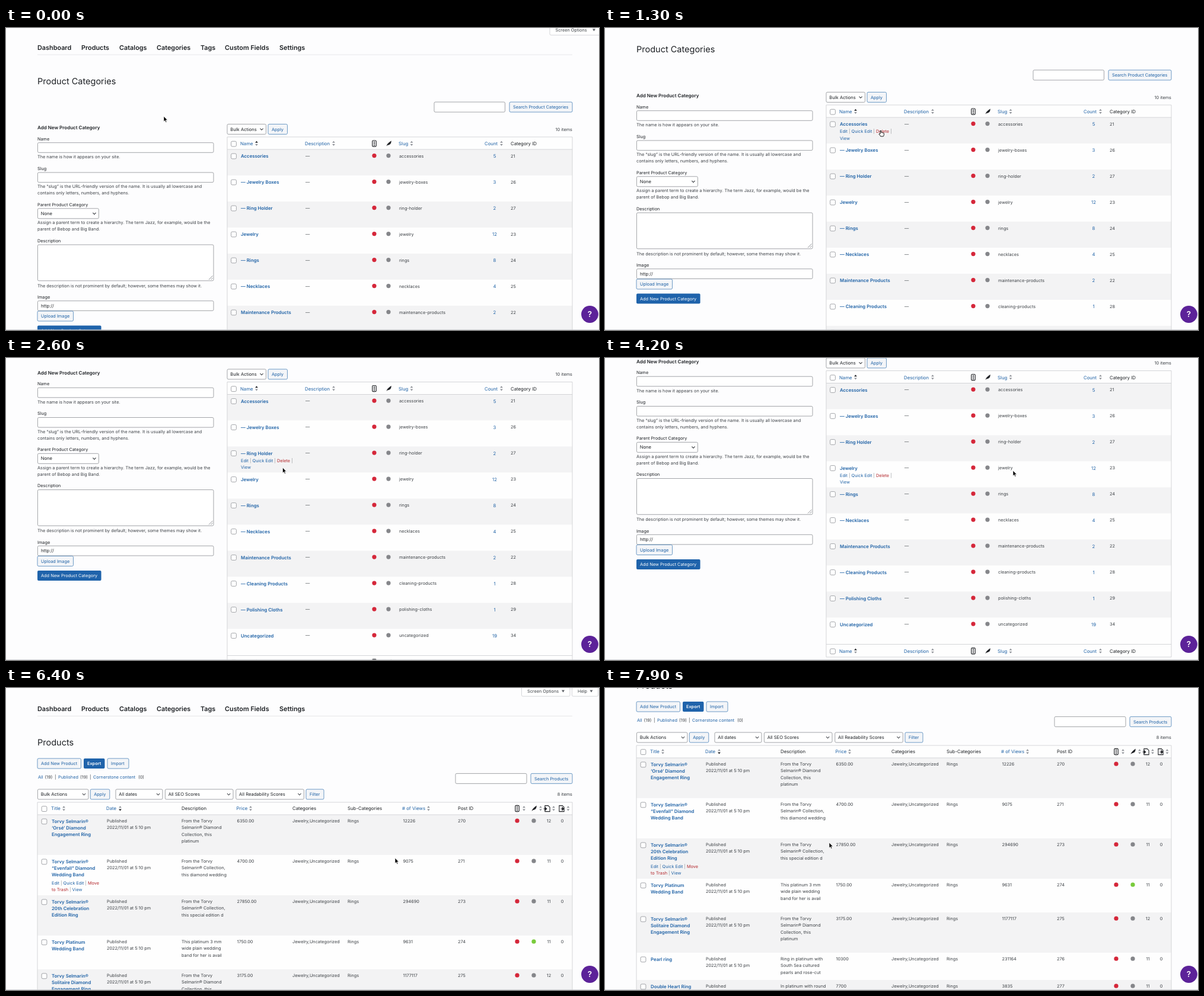
An HTML page for the animation above (8 s loop, 1000 px wide and 510 px high).

```html
<!DOCTYPE html>
<html lang="en">
<head>
<meta charset="utf-8">
<title>Shop admin</title>
<style>
  html, body { margin: 0; width: 100%; height: 100%; overflow: hidden; background: #fdfdfe; }
  svg { display: block; width: 1000px; height: 510px; }
  text {
    font: 7.3px Inter, "Open Sans", sans-serif;
    fill: #3c4045;
    dominant-baseline: central;
    text-rendering: geometricPrecision;
    white-space: pre;
  }
  .link { fill: #1f62a6; }
  .dark { fill: #1d2024; }
  .white { fill: #fff; }
  .del { fill: #b3262b; }
  .bar { fill: #8e9094; }
  .box { fill: #fff; stroke: #8c8f94; stroke-width: .8; }
  .btn { fill: #f3f5f8; stroke: #4a82b8; stroke-width: .8; }
  .primary { fill: #1f63ab; }
  .rule { stroke: #cbccd0; stroke-width: .8; fill: none; }
  .hide { display: none; }
</style>
</head>
<body>
<svg id="stage" viewBox="0 0 1000 510" xmlns="http://www.w3.org/2000/svg"></svg>
<script>
const LOOP = 8000, STEP = 100, SWITCH = 5700;
const RED = '#d5273a', GREY = '#85868a', GREEN = '#79cb3c', INK = '#202226';
const stage = document.getElementById('stage');

function el(parent, tag, attrs, content) {
  const node = document.createElementNS('http://www.w3.org/2000/svg', tag);
  for (const key in attrs) node.setAttribute(key, attrs[key]);
  if (content !== undefined) node.textContent = content;
  return parent.appendChild(node);
}

function text(g, x, y, str, cls = '', size = 7.3, weight = 400, anchor = 'start') {
  return el(g, 'text', {
    x, y, class: cls, 'text-anchor': anchor,
    style: `font-size:${size}px;font-weight:${weight}`
  }, str);
}

const lines = (g, x, y, list, ...rest) =>
  list.forEach((str, i) => text(g, x, y + i * 11.25, str, ...rest));

const rect = (g, x, y, width, height, cls, rx = 2) =>
  el(g, 'rect', { x, y, width, height, rx, class: cls });

const path = (g, d, attrs) => el(g, 'path', { d, fill: 'none', ...attrs });

const dot = (g, cx, cy, fill) => el(g, 'circle', { cx, cy, r: 3.6, fill });

const checkbox = (g, x, y) => rect(g, x - 4.4, y - 4.2, 8.8, 8.8, 'box', 2);

function button(g, x, y, w, label, primary, weight) {
  rect(g, x, y, w, 17, primary ? 'primary' : 'btn');
  text(g, x + 6, y + 8.6, label, primary ? 'white' : 'link', 7.35, weight);
}

function select(g, x, y, w, label) {
  rect(g, x, y, w, 17, 'box');
  text(g, x + 5.3, y + 8.6, label, 'dark', 7.6);
  path(g, `M${x + w - 10} ${y + 7.2}l2.6 2.6l2.6 -2.6`, { stroke: '#45484d', 'stroke-width': 1.1 });
}

// active: -1 sorted upwards, 1 sorted downwards
function sorter(g, x, y, active = 0) {
  const tone = side => active === side ? INK : '#8f9298';
  path(g, `M${x - 2.4} ${y - 1.2}h4.8l-2.4 -3z`, { fill: tone(-1) });
  path(g, `M${x - 2.4} ${y + 1}h4.8l-2.4 3z`, { fill: tone(1) });
}

function trafficIcon(g, x, y) {
  el(g, 'rect', { x: x - 3.2, y: y - 5, width: 6.4, height: 10.2, rx: 1.4, fill: '#fff', stroke: INK, 'stroke-width': 1.2 });
  for (const dy of [-2.6, .1, 2.8]) el(g, 'circle', { cx: x, cy: y + dy, r: 1, fill: INK });
}

function featherIcon(g, x, y) {
  path(g, `M${x - 4} ${y + 4.6}c1-3 2-4 3-5c2-2.4 4-3 5.2-4.4c.2 3-.6 5-2.2 6.2c-1.4 1-2.8 1.2-4 1.4z`, { fill: INK });
}

function pageIcon(g, x, y, arrowX) {
  path(g, `M${x - 3.6} ${y - 4.8}h5.4l2.8 2.8v7.2h-8.2z`, { stroke: INK, 'stroke-width': 1.1 });
  path(g, `M${arrowX} ${y + .6}h4m-1.4 -2.4l2.6 2.4l-2.6 2.4z`, { stroke: INK, 'stroke-width': 1.2, fill: INK });
}

function tab(g, x, w, bottom, label) {
  path(g, `M${x} -20V${bottom - 2}q0 2 2 2h${w - 4}q2 0 2 -2V-20`, { class: 'rule', style: 'fill:#fff' });
  text(g, x + 9.5, bottom - 8.6, label);
  path(g, `M${x + w - 14} ${bottom - 10.5}h5l-2.5 4z`, { fill: '#5c6066' });
}

function navBar(g, y) {
  const items = { Dashboard: 53, Products: 127, Catalogs: 191, Categories: 254, Tags: 328, 'Custom Fields': 369, Settings: 461 };
  for (const name in items) text(g, items[name], y, name, 'dark', 10.85, 600);
  path(g, `M53 ${y + 12.6}H955`, { stroke: '#e2e3e5', 'stroke-width': .8 });
}

// one line of row actions, split by thin bars
function actionLine(g, x, y, parts) {
  const line = text(g, x, y, '');
  parts.forEach(([label, cls]) => el(line, 'tspan', { class: cls }, label));
}
const BAR = [' | ', 'bar'];

function stripe(g, x, y, h, odd) {
  el(g, 'rect', { x, y, width: 955 - x, height: h, fill: odd ? '#fefefe' : '#f3f3f4' });
}

/* Category list */
const catRows = [
  ['Accessories', 5, 21], ['— Jewelry Boxes', 3, 26], ['— Ring Holder', 2, 27],
  ['Jewelry', 12, 23], ['— Rings', 8, 24], ['— Necklaces', 4, 25],
  ['Maintenance Products', 2, 22], ['— Cleaning Products', 1, 28],
  ['— Polishing Cloths', 1, 29], ['Uncategorized', 19, 34]
];

function catHeader(g, y) {
  checkbox(g, 384, y + .5);
  text(g, 395, y, 'Name', 'link', 7.8);
  sorter(g, 422.5, y, -1);
  text(g, 504, y, 'Description', 'link', 7.8);
  sorter(g, 552.5, y);
  trafficIcon(g, 621, y);
  featherIcon(g, 645.5, y);
  text(g, 662, y, 'Slug', 'link', 7.8);
  sorter(g, 684, y);
  text(g, 807, y, 'Count', 'link', 7.8);
  sorter(g, 835.5, y);
  text(g, 851, y, 'Category ID', 'dark', 7.8);
}

function buildCategories(g) {
  tab(g, 917, 86, 12, 'Screen Options');
  navBar(g, 32.5);
  text(g, 53, 90, 'Product Categories', 'dark', 14.5);
  rect(g, 722, 125, 119.5, 17, 'box');
  button(g, 849, 125, 106, 'Search Product Categories');

  text(g, 53, 168, 'Add New Product Category', 'dark', 8, 600);
  const labels = { Name: 187, Slug: 237.3, 'Parent Product Category': 298.3, Description: 359.3, Image: 454.5 };
  for (const name in labels) text(g, 53, labels[name], name, 'dark');
  for (const y of [193.7, 244, 460.8]) rect(g, 53.4, y, 296.6, 16.6, 'box');
  lines(g, 53, 217.6, ['The name is how it appears on your site.']);
  lines(g, 53, 267.6, ['The “slug” is the URL-friendly version of the name. It is usually all lowercase and',
    'contains only letters, numbers, and hyphens.']);
  select(g, 53.4, 304.8, 103, 'None');
  lines(g, 53, 328.7, ['Assign a parent term to create a hierarchy. The term Jazz, for example, would be the',
    'parent of Bebop and Big Band.']);
  rect(g, 53.4, 366, 296.6, 60.8, 'box');
  path(g, 'M342 425l6.5 -6.5M345.5 425l3 -3', { stroke: '#777a80', 'stroke-width': .8 });
  lines(g, 53, 435, ['The description is not prominent by default; however, some themes may show it.']);
  text(g, 59, 469.2, 'http://', 'dark', 7.6);
  button(g, 53, 478, 60.5, 'Upload Image');
  button(g, 53, 502.6, 107.6, 'Add New Product Category', true);

  select(g, 373, 162.4, 65.5, 'Bulk Actions');
  button(g, 442, 162.4, 32.5, 'Apply');
  text(g, 955, 171, '10 items', '', 7.35, 400, 'end');

  el(g, 'rect', { x: 373, y: 184, width: 582, height: 483.5, fill: '#fefefe' });
  catHeader(g, 195);
  catRows.forEach(([name, count, id], i) => {
    const top = 205 + i * 44, y = top + 11;
    stripe(g, 373, top, 44, i % 2);
    checkbox(g, 384, y + .3);
    text(g, 396, y, name, 'link', 7.8, 600);
    text(g, 505, y, '—');
    dot(g, 621, y - .4, RED);
    dot(g, 645, y - .4, GREY);
    text(g, 663, y, name.replace('— ', '').toLowerCase().replace(' ', '-'));
    text(g, 824, y, count, 'link', 7.8, 400, 'middle');
    text(g, 851, y, id);
  });
  catHeader(g, 657.2);
  path(g, 'M373 184H955V667.5H373ZM373 205H955M373 646H955', { class: 'rule' });

  const actions = el(g, 'g', { class: 'hide' });
  actionLine(actions, 396, 23.3, [['Edit', 'link'], BAR, ['Quick Edit', 'link'], BAR, ['Delete', 'del'], BAR]);
  actionLine(actions, 396, 34.6, [['View', 'link']]);
  return actions;
}

/* Product list */
const maker = 'Torvy', series = 'Selmarin®', brand = `${maker} ${series}`;
const from = `From the ${maker}`;
// top, title, description, price, views, links, readability
const products = [
  [214, [brand, '‘Orsé’ Diamond', 'Engagement Ring'], [from, `${series} Diamond`, 'Collection, this', 'platinum'], '6350.00', 12226, 12],
  [282, [brand, '“Evenfall” Diamond', 'Wedding Band'], [from, `${series} Collection,`, 'this diamond wedding'], '4700.00', 9075, 11],
  [350, [brand, '20th Celebration', 'Edition Ring'], [from, `${series} Collection,`, 'this special edition d'], '27850.00', 294690, 11],
  [418, [`${maker} Platinum`, 'Wedding Band'], ['This platinum 3 mm', 'wide plain wedding', 'band for her is avail'], '1750.00', 9631, 11, GREEN],
  [475, [brand, 'Solitaire Diamond', 'Engagement Ring'], [from, `${series} Diamond`, 'Collection, this', 'platinum'], '3175.00', 1177117, 12],
  [543, ['Pearl ring'], ['Ring in platinum with', 'South Sea cultured', 'pearls and rose-cut'], '10300', 231164, 11],
  [589, ['Double Heart Ring'], ['In platinum with round'], '7700', 3835, 11]
];
const productEnd = 646;

function buildProducts(g) {
  tab(g, 869.5, 81.5, 14, 'Screen Options');
  tab(g, 954.5, 44, 14, 'Help');
  navBar(g, 34.8);
  text(g, 53, 92.3, 'Products', 'dark', 14.5);
  button(g, 53, 119, 73.5, 'Add New Product');
  button(g, 131, 119, 35.5, 'Export', true, 600);
  button(g, 171, 119, 36, 'Import');
  [[54, 'All', 1], [65.5, '(19)'], [82, '|'], [88, 'Published', 1], [125, '(19)'], [141, '|'],
    [147, 'Cornerstone content', 1], [223, '(0)']].forEach(([x, str, link]) => text(g, x, 150.5, str, link ? 'link' : ''));
  rect(g, 758, 144.4, 120, 17, 'box');
  button(g, 885, 144.4, 70, 'Search Products');
  select(g, 53.4, 171, 85.5, 'Bulk Actions');
  button(g, 142.3, 171, 32.5, 'Apply');
  select(g, 185, 171, 79, 'All dates');
  select(g, 268.4, 171, 114.6, 'All SEO Scores');
  select(g, 387.8, 171, 114.6, 'All Readability Scores');
  button(g, 506, 171, 30, 'Filter');
  text(g, 955, 179.6, '8 items', '', 7.35, 400, 'end');

  const y = 203.4;
  el(g, 'rect', { x: 53, y: 193, width: 902, height: 21, fill: '#fefefe' });
  checkbox(g, 64.5, y + .5);
  [[76, 'Title', 97.5], [169, 'Date', 192.5, 1], [296, 'Description'], [388.5, 'Price', 412.5], [483, 'Categories'],
    [576, 'Sub-Categories'], [668, '# of Views', 712.5], [762, 'Post ID']].forEach(([x, str, sortX, active]) => {
    text(g, x, y, str, sortX ? 'link' : 'dark', 7.8);
    if (sortX) sorter(g, sortX, y, active);
  });
  trafficIcon(g, 862, y);
  featherIcon(g, 890.5, y);
  pageIcon(g, 912.5, y, 906.5);
  pageIcon(g, 936.5, y, 935.5);
  for (const x of [873.5, 901.5, 923.5, 948]) sorter(g, x, y);

  products.forEach(([top, title, about, price, views, links, tone = GREY], i) => {
    const next = products[i + 1], end = next ? next[0] : productEnd, y = top + 10.6;
    stripe(g, 53, top, end - top, i % 2);
    checkbox(g, 64.5, y + .6);
    lines(g, 77, y, title, 'link', 7.8, 600);
    lines(g, 170, y, ['Published', '2022/11/01 at 5:10 pm']);
    lines(g, 296, y, about);
    text(g, 389.5, y, price);
    text(g, 483, y, 'Jewelry,Uncategorized');
    text(g, 576, y, 'Rings');
    text(g, 669.5, y, views);
    text(g, 762, y, i < 2 ? 270 + i : 271 + i);
    dot(g, 862, y - .4, RED);
    dot(g, 890, y - .4, tone);
    text(g, 915.5, y, links, '', 7.3, 400, 'middle');
    text(g, 938, y, 0, '', 7.3, 400, 'middle');
  });
  path(g, `M53 193H955V${productEnd}H53ZM53 214H955`, { class: 'rule' });

  const actions = el(g, 'g', { class: 'hide' });
  actionLine(actions, 77, 0, [['Edit', 'link'], BAR, ['Quick Edit', 'link'], BAR, ['Move', 'del']]);
  actionLine(actions, 77, 11.3, [['to Trash', 'del'], BAR, ['View', 'link']]);
  return actions;
}

const catPage = el(stage, 'g', {}), prodPage = el(stage, 'g', {});
const catActions = buildCategories(catPage), prodActions = buildProducts(prodPage);
path(stage, 'M0 509.5H1000', { class: 'rule' });
el(stage, 'circle', { cx: 984.5, cy: 483.5, r: 14.4, fill: '#5c2299' });
text(stage, 984.5, 484, '?', 'white', 13.5, 600, 'middle');

const arrow = path(stage, 'M0 0V9.2L2.1 7.3L3.5 10.4L5 9.7L3.6 6.7H6.4Z', { fill: '#000', stroke: '#fff', 'stroke-width': .7 });
const hand = path(stage, 'M-.9 6V.8Q0 -.3 .9 .8V3.6Q2 3 2.6 3.9Q3.7 3.4 4.2 4.4Q5.3 4.2 5.4 5.2V7.4Q5.2 9 4.4 10H-.2Q-1.2 8.4-3 6.2Q-2.8 4.8-.9 6Z',
  { fill: '#fff', stroke: '#000', 'stroke-width': .9 });

// time, x, y of the pointer tip
const pointer = [[0, 266, 149], [300, 270, 150], [900, 462, 172], [1300, 465, 173], [2000, 463, 177], [2600, 466.5, 185],
  [3500, 467, 187], [4200, 688, 190], [4700, 822, 182], [5700, 822, 182], [6300, 656, 287], [6700, 656, 287],
  [7500, 378, 261], [8000, 378, 261]];
// time, scroll offset
const catScroll = [[0, 0], [300, 0], [1000, 54], [1500, 54], [2000, 92.5], [2600, 143.5], [3100, 162.5], [8000, 162.5]];
const prodScroll = [[0, 0], [6700, 0], [7700, 96], [8000, 96]];

function at(keys, t, col = 1) {
  const i = Math.max(1, keys.findIndex(k => k[0] > t)), a = keys[i - 1], b = keys[i];
  return a[col] + (b[col] - a[col]) * (t - a[0]) / (b[0] - a[0]);
}

const move = (node, x, y) => node.setAttribute('transform', `translate(${x} ${y})`);
const show = (node, on) => node.classList.toggle('hide', !on);

function draw(now) {
  const t = Math.floor(now % LOOP / STEP) * STEP;
  const x = at(pointer, t), y = at(pointer, t, 2);
  const onCats = t < SWITCH;
  let overLink = false;
  show(catPage, onCats);
  show(prodPage, !onCats);

  if (onCats) {
    const scroll = at(catScroll, t), depth = y + scroll - 205;
    const row = Math.floor(depth / 44), inRow = depth - row * 44;
    const hover = x > 373 && x < 955 && row >= 0 && row < catRows.length;
    move(catPage, 0, -scroll);
    move(catActions, 0, 205 + row * 44);
    show(catActions, hover);
    overLink = hover && (x > 457 && x < 480 && inRow > 17 && inRow < 29 || x > 817 && x < 830 && inRow < 17);
  } else {
    const scroll = at(prodScroll, t);
    const row = products.filter(p => p[0] <= y + scroll).pop();
    move(prodPage, 0, -scroll);
    show(prodActions, !!row);
    if (row) move(prodActions, 0, row[0] + 12.9 + row[1].length * 11.2);
  }
  show(arrow, !overLink);
  show(hand, overLink);
  move(arrow, x, y);
  move(hand, x, y);
}

const start = performance.now();
function tick() {
  draw(performance.now() - start);
  requestAnimationFrame(tick);
}
tick();
</script>
</body>
</html>
```
